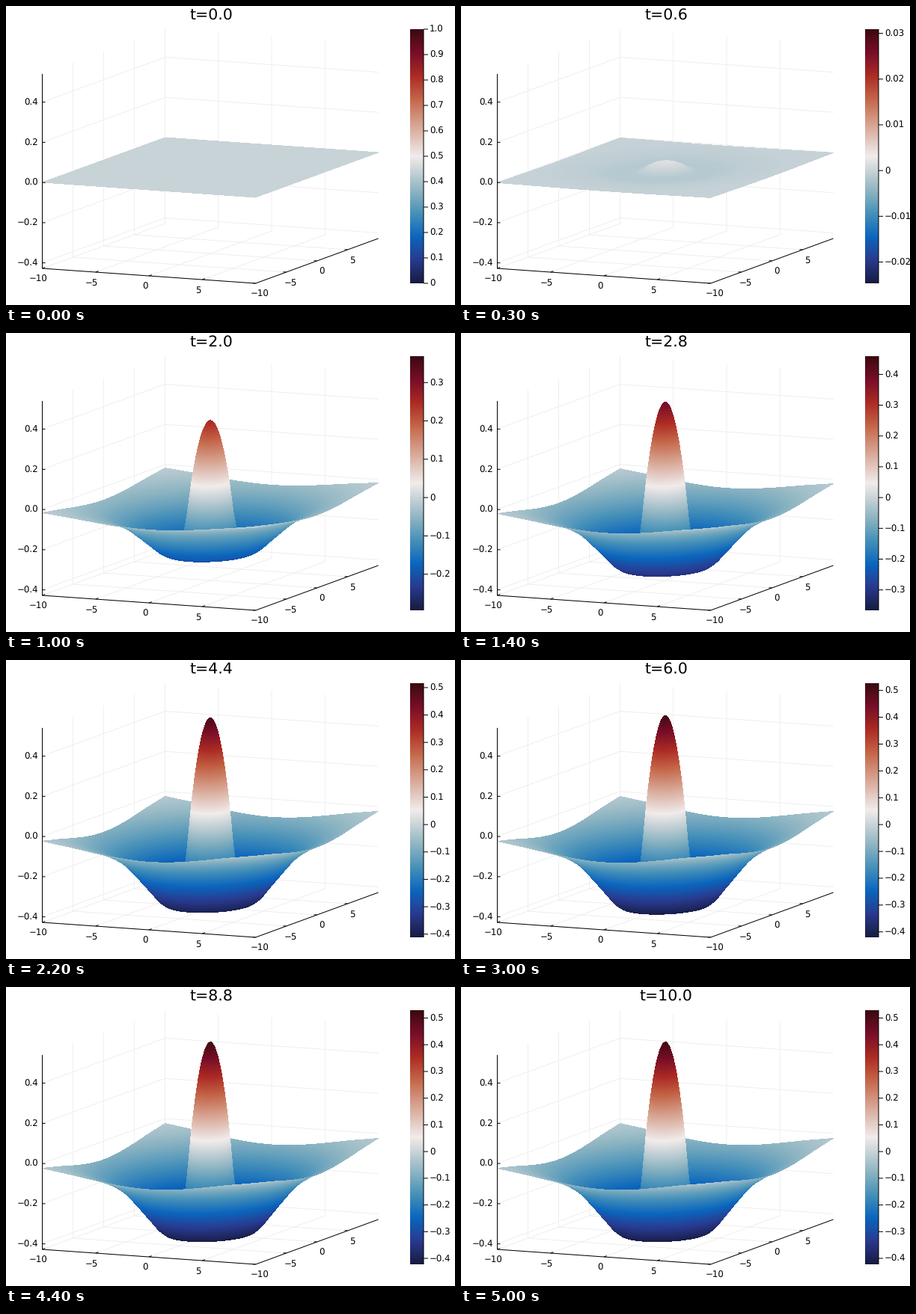
These frames come from a looping animation (600x400 px, 5.1 s). A matplotlib script:

```python
import math

import numpy as np
import matplotlib.pyplot as plt
from matplotlib.animation import FuncAnimation
from matplotlib.collections import LineCollection
from matplotlib.colors import LinearSegmentedColormap

W, H, DPI = 600, 400, 100
FRAMES, STEP_MS = 51, 100
LEFT = 48.5
Z_LOW, Z_HIGH = -0.428, 0.54
PEAK, TROUGH = 0.5296, -0.4224
PX = 72 / DPI  # points per pixel

plt.rcParams["font.family"] = "DejaVu Sans"
plt.rcParams["text.hinting"] = "no_hinting"

balance = LinearSegmentedColormap.from_list("balance", [
    (0, "#171c42"), (1 / 11, "#293a8f"), (2 / 11, "#0b66bd"),
    (3 / 11, "#4590b9"), (4 / 11, "#8eb5c2"), (5 / 11, "#d2d8db"),
    (0.5, "#f1eceb"), (6 / 11, "#e6d2cc"), (7 / 11, "#d59d89"),
    (8 / 11, "#c46548"), (9 / 11, "#ac2b24"), (10 / 11, "#780e28"),
    (1, "#3c0911")], N=512)


def project(x, y, z):
    """Orthographic view: data coordinates to stage pixels."""
    u, v = (x + 10) / 20, (y + 10) / 20
    return LEFT + 285 * u + 164 * v, 236 + 20 * u - 60 * v - 268.75 * z


def profile(r):
    """Radial shape of the settled bump, a cubic through a few knots."""
    kr = np.array([0, .5, 1, 1.5, 2, 2.5, 3.3, 4, 5, 6, 7, 8.5, 10, 12, 14.2])
    kz = np.array([PEAK, .485, .35, .125, -.18, -.358, TROUGH, -.404, -.336,
                   -.264, -.197, -.134, -.093, -.052, -.023])
    slope = np.gradient(kz, kr)
    slope[0] = 0
    i = np.clip(np.searchsorted(kr, r, side="right") - 1, 0, len(kr) - 2)
    h = kr[i + 1] - kr[i]
    s = (r - kr[i]) / h
    return (kz[i] * (1 + 2 * s) * (1 - s) ** 2 + kz[i + 1] * s * s * (3 - 2 * s)
            + h * slope[i] * s * (1 - s) ** 2
            + h * slope[i + 1] * s * s * (s - 1))


def growth(n, dt=0.005):
    """Amplitude per frame: leaky field driven through a sigmoid."""
    per_frame = round(0.2 / dt)
    a, out = 0.0, [0.0]
    for k in range(1, (n - 1) * per_frame + 1):
        a += 1.03 * dt * (1 / (1 + math.exp(-20 * (a - 0.1273))) - a)
        if k % per_frame == 0:
            out.append(a)
    return out


def tick_step(span):
    exponent = math.floor(math.log10(span) + 1e-9)
    factor = span / 10 ** exponent
    unit = 2 if factor > 5 else 1 if factor > 2.5 else 0.5 if factor > 1.000001 else 0.2
    return unit * 10 ** exponent / 2


def number(v, places):
    return f"{v:.{places}f}".replace("-", "\u2212")


fig = plt.figure(figsize=(W / DPI, H / DPI), dpi=DPI, facecolor="white")
ax = fig.add_axes([0, 0, 1, 1])
ax.axis("off")


def label(x, y, text, ha="center", size=11.8):
    return ax.text(x, y + 0.365 * size, text, ha=ha, va="baseline",
                   fontsize=size * PX, color="black")


def lines(segments, color, width, z):
    return ax.add_collection(LineCollection(
        segments, colors=color, linewidths=width * PX, zorder=z, snap=False),
        autolim=False)


def picture(data, low, high, extent, z):
    return ax.imshow(data, cmap=balance, vmin=low, vmax=high, extent=extent,
                     aspect="auto", interpolation="nearest", zorder=z)


def edge(*points):
    return [project(*p) for p in points]


def toward(p, dx, dy, length=4):
    d = math.hypot(dx, dy)
    return [p, (p[0] + dx / d * length, p[1] + dy / d * length)]


# Grid on the floor and the two back walls
grid = []
for c in (-10, -5, 0, 5):
    grid.append(edge((c, -10, Z_LOW), (c, 10, Z_LOW), (c, 10, Z_HIGH)))
    grid.append(edge((10, c, Z_LOW), (-10, c, Z_LOW), (-10, c, Z_HIGH)))
z_ticks = (-0.4, -0.2, 0, 0.2, 0.4)
for c in z_ticks:
    grid.append(edge((-10, -10, c), (-10, 10, c), (10, 10, c)))
lines(grid, "#ebebeb", 0.8, 1)

# Axes with ticks and labels
axis = [edge((-10, -10, Z_HIGH), (-10, -10, Z_LOW), (10, -10, Z_LOW), (10, 10, Z_LOW))]
for c in (-10, -5, 0, 5):
    name = number(c, 0)
    p = project(c, -10, Z_LOW)
    axis.append(toward(p, 8.2, -3))
    label(p[0] - 5.5, p[1] + 13, name)
    p = project(10, c, Z_LOW)
    axis.append(toward(p, -14.25, -1))
    label(p[0] + 6, p[1] + 13, name)
for c in z_ticks:
    p = project(-10, -10, c)
    axis.append(toward(p, 14.25, 1))
    label(43, p[1], number(c, 1), "right")
lines(axis, "black", 1, 4)

picture(np.linspace(1, 0, 340)[:, None], 0, 1, (540, 558, 371, 31), 2)
bar_ticks = lines([], "black", 1, 4)
title = label(274, 11, "", size=20.5)

# One line of sight per pixel column, sampled from far to near
columns = np.arange(49, 498)
offset = columns + 0.5 - LEFT
far = np.minimum(10, offset / 8.2 - 10)
near = np.maximum(-10, (offset - 285) / 8.2 - 10)
gy = np.linspace(far, near, 4500)
gx = (offset - 8.2 * (gy + 10)) / 14.25 - 10
shape = profile(np.hypot(gx, gy)).astype(np.float32)
ground = project(gx, gy, 0)[1].astype(np.float32)
col = np.broadcast_to(np.arange(len(columns)), shape.shape)
del gx, gy
surface = picture(np.zeros((H, len(columns))), Z_LOW, Z_HIGH,
                  (columns[0], columns[-1] + 1, H, 0), 3)

ax.set_xlim(0, W)
ax.set_ylim(H, 0)
amplitude = growth(FRAMES)
bar_labels = []


def draw(i):
    a = amplitude[i]
    z = shape * np.float32(a)
    row = (ground - np.float32(268.75) * z).astype(np.int32)
    view = np.full((H, len(columns)), np.nan)
    view[row, col] = z  # nearer samples overwrite farther ones
    surface.set_data(view)

    # The bar spans the data; a flat field falls back to 0..1
    low, high = (a * TROUGH, a * PEAK) if a > 0 else (0, 1)
    step = tick_step(high - low)
    places = len(f"{step:.8f}".rstrip("0").split(".")[1])
    while bar_labels:
        bar_labels.pop().remove()
    marks = [[(558, 31), (558, 371)]]
    first, last = math.ceil(low / step - 1e-6), math.floor(high / step + 1e-6)
    for k in range(first, last + 1):
        v = k * step
        # whole numbers at the origin carry no decimals
        text = number(v, places if k else 0)
        y = 371 - 340 * (v - low) / (high - low)
        marks.append([(558, y), (564, y)])
        bar_labels.append(label(566, y, text, "left"))
    bar_ticks.set_segments(marks)
    title.set_text(f"t={i * 0.2:.1f}")
    return [surface, bar_ticks, title, *bar_labels]


anim = FuncAnimation(fig, draw, frames=FRAMES, interval=STEP_MS, repeat=True,
                     repeat_delay=0, blit=False)
plt.show()
```
